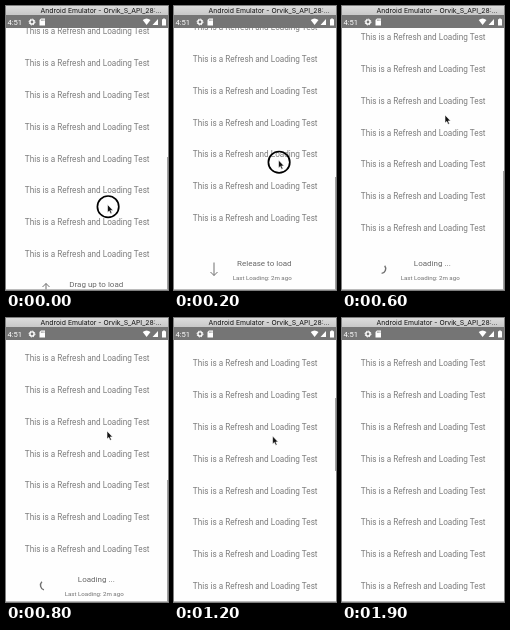
An HTML page for the animation above (2000 ms loop, 162 by 284 pixels).

```html
<!DOCTYPE html>
<html lang="en">
<head>
<meta charset="utf-8">
<title>Refresh and loading</title>
<style>
  html, body { margin: 0; width: 100%; height: 100%; overflow: hidden; background: #fefefe; }
  svg { display: block; width: 100vw; height: 100vh; }
  text { font-family: Roboto, sans-serif; fill: #7c7c7c; }
  .mid { text-anchor: middle; }
  .row { font-size: 8.19px; }
  .hint { font-size: 8px; fill: #686868; }
  .note { font-size: 6.15px; fill: #707070; }
  .title { font: 6.85px Inter, sans-serif; fill: #111; }
  .clock { font-size: 7.6px; fill: #fff; }
  .line { fill: none; stroke: #707070; }
</style>
</head>
<body>
<svg viewBox="0 0 162 284">
  <defs>
    <linearGradient id="chrome" x2="0" y2="1">
      <stop stop-color="#dcdcdc"/><stop offset="1" stop-color="#c8c8c8"/>
    </linearGradient>
  </defs>
  <rect width="162" height="284" fill="#fefefe"/>
  <g id="rows"></g>
  <g id="footer">
    <text id="hint" class="mid hint" x="90.3" y="259.8"></text>
    <text class="mid note" x="88.2" y="274">Last Loading: 2m ago</text>
    <path id="arrow" class="line" d="M40 256.5V269.5M36.5 266L40 269.5L43.5 266"/>
    <path id="spinner" class="line" stroke-width="1.4" d="M42.7 259.7A4.8 4.8 0 0 1 39.6 267.4"/>
  </g>
  <rect id="bar" x="161" width="1" fill="#a0a0a0"/>
  <rect y="283.2" width="162" height=".8" fill="#aaa"/>

  <rect y="9" width="162" height="13" fill="#757575"/>
  <text class="clock" x="1.4" y="18.7">4:51</text>
  <circle cx="26" cy="16" r="2.1" fill="none" stroke="#fff" stroke-width="1.4"/>
  <circle cx="26" cy="16" r="3" fill="none" stroke="#fff" stroke-width="1" stroke-dasharray="1.2 1.156"/>
  <path fill="#fff" d="M35 12.5H39V19.5H33.5V14Z"/>
  <path stroke="#757575" stroke-width=".6" d="M35.4 13.4V15M36.7 13.4V15M38 13.4V15"/>
  <path fill="#fff" d="M136.7 14Q140.6 11 144.5 14L140.6 19ZM152 13V19H146.5Z"/>
  <path fill="#fff" d="M156 13.2H157.1V12.4H158.9V13.2H160V19.6H156Z"/>

  <rect width="162" height="9" fill="url(#chrome)"/>
  <text class="title" x="34.6" y="6.8">Android Emulator - Orvik_S_API_28:...</text>

  <g id="pointer">
    <circle id="ring" cx=".6" cy="2.2" r="10.7" fill="none" stroke="#000" stroke-width="1.7"/>
    <path d="M0 0V8L1.8 6.4L3.1 9.3L4.5 8.7L3.2 5.9H5.6Z" fill="#111" stroke="#fff" stroke-width=".6"/>
  </g>
</svg>
<script>
const $ = id => document.getElementById(id);
const STEP = 100, LOOP = 2000, PITCH = 31.86, FOOTER = 41;

// One pose per step: pull distance, pointer x, pointer y, scrollbar top
const drag = [
  [20, 101.5, 198.5, 151],
  [38, 103, 177, 161],
  [56, 104.5, 154, 171],
  [69, 105.5, 128, 178],
  [80, 106.5, 104.5, 184],
  [64, 105, 106, 174],
  [46, 103, 109, 165],
  [42, 102, 111, 163],
  [37, 101, 113, 162],
  [11, 100.4, 115.5, 158],
  [1, 99.8, 117.3, 157],
  [0.4, 99.2, 117.8, 157],
  [0, 98.6, 118, 80]
];
const exit = [[102, 108], [114, 76], [134, 30]];

for (let i = 0; i < 10; i++) {
  const row = document.createElementNS("http://www.w3.org/2000/svg", "text");
  row.textContent = "This is a Refresh and Loading Test";
  row.setAttribute("class", "mid row");
  row.setAttribute("x", 81.2);
  row.setAttribute("y", 271.2 - i * PITCH);
  $("rows").append(row);
}

const move = (id, x, y) => $(id).setAttribute("transform", `translate(${x} ${y})`);
const show = (id, on) => $(id).setAttribute("visibility", on ? "visible" : "hidden");

function draw(step) {
  const [pull, px, py, top] = drag[Math.min(step, drag.length - 1)];
  const leaving = step - 16;
  const loading = step > 4;
  const bottom = step < 12 ? 284 : 153;

  move("rows", 0, -pull);
  move("footer", 0, Math.max(0, FOOTER - pull));
  $("hint").textContent = loading ? "Loading ..." : pull < FOOTER ? "Drag up to load" : "Release to load";

  show("arrow", !loading);
  show("spinner", loading);
  $("arrow").setAttribute("transform", `rotate(${pull < FOOTER ? 180 : 0} 40 263)`);
  $("spinner").setAttribute("transform", `rotate(${(step - 6) * 72} 39 263)`);

  $("bar").setAttribute("y", top);
  $("bar").setAttribute("height", bottom - top);
  $("bar").setAttribute("opacity", leaving < 0 ? 1 : 0.75 - leaving * 0.23);

  const [x, y] = exit[leaving] || [px, py];
  move("pointer", x, y);
  show("pointer", leaving < exit.length);
  show("ring", !loading);
}

const start = performance.now();
function tick() {
  draw(Math.floor((performance.now() - start) % LOOP / STEP));
  requestAnimationFrame(tick);
}
tick();
</script>
</body>
</html>
```
